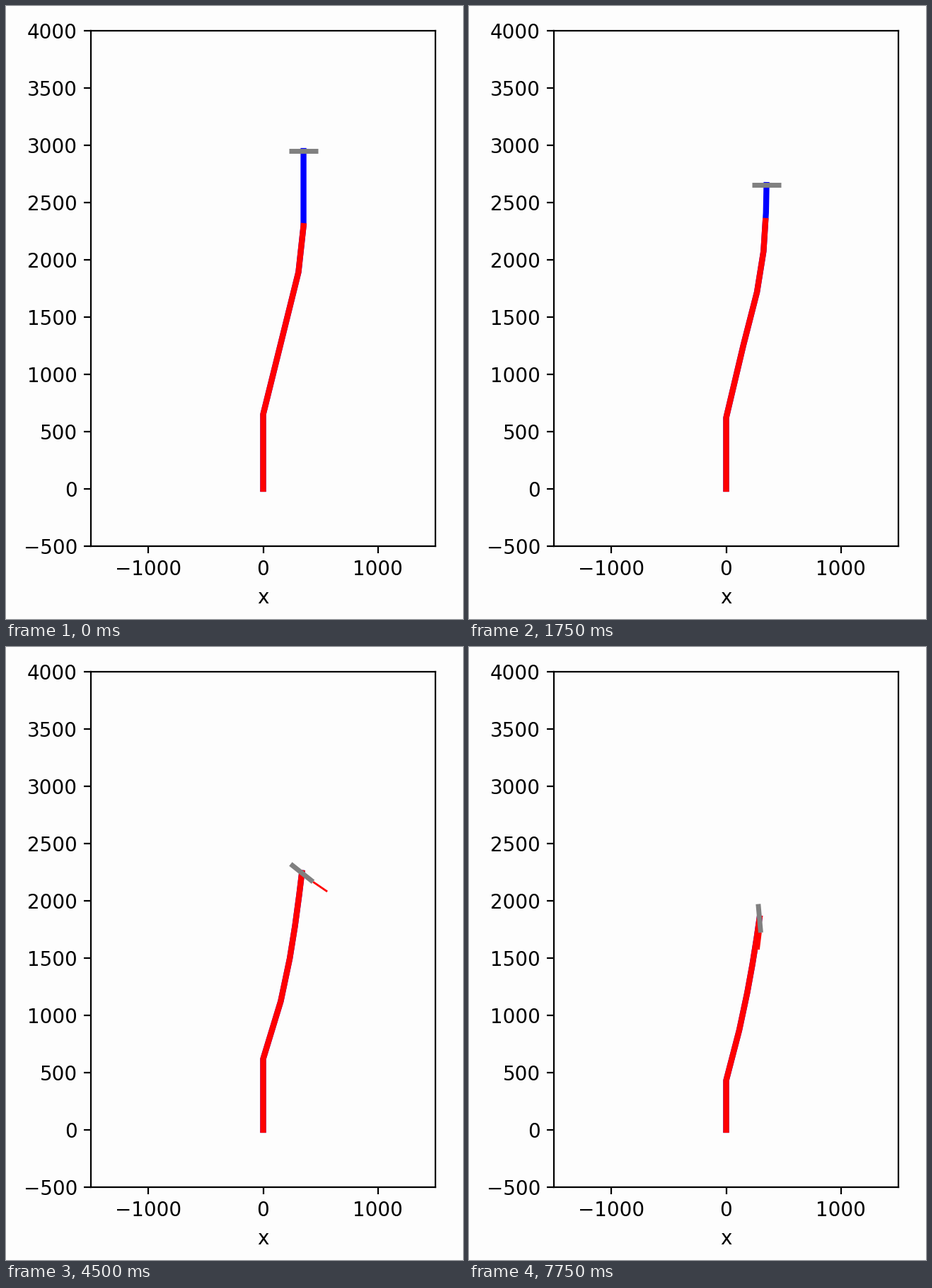
A matplotlib script for the animation above (8000 ms loop, 646 by 867 pixels).

```python
import matplotlib.pyplot as plt
import numpy as np
from matplotlib.animation import FuncAnimation

W, H, DPI = 646, 867, 200
STEP, FRAMES = 250, 32
HALF_DECK, GATE = 125, 150
LEVEL_UNTIL, GATE_OPENS = 2.5, 2.75

# Heights of the boom's joints, as shares of the way from shoulder to tip.
JOINTS = np.array([0, 0.31, 0.54, 0.715, 0.88, 1])


def ramp(t, start, end):
    return np.clip((t - start) / (end - start), 0, 1)


def mix(a, b, k):
    return a + (b - a) * k


def since_level(t):
    return max(0, t - LEVEL_UNTIL)


def tip(t):
    return np.array([352 - 5.1 * since_level(t) ** 1.5,
                     2948 - 177.5 * t + 4.55 * t ** 2])


def shoulder(t):
    """Height at which the boom leaves the vertical."""
    sinking = 650 - 115 * min(t, 1)
    return mix(sinking, 705, ramp(t, 1, 2.5)) - 37.5 * since_level(t) ** 1.2


def sideways(t, u):
    """Share of the tip's x reached at height share u."""
    angular = np.interp(u, [0, 0.54, 0.715, 1], [0, 0.875, 1, 1])
    decay = np.exp(-0.45 * max(0, t - 3.75))
    s_bend = -0.22 + 1.25 * u
    arc = 0.3 + (0.68 - 0.5 * u) * decay
    bulge = mix(s_bend, arc, ramp(t, 2.5, 3.75))
    return mix(angular, u + u * (1 - u) * bulge, ramp(t, 1, 2.5))


def boom_path(t, end=1):
    """Points from the base up to the given share of the boom."""
    x = tip(t)[0] * sideways(t, JOINTS)
    u = np.append(JOINTS[JOINTS < end], end)
    y = mix(shoulder(t), tip(t)[1], u)
    return np.append(0, np.interp(u, JOINTS, x)), np.append(0, y)


def red_share(t):
    return mix(JOINTS[3], 0.976, ramp(t, 1, 2.5)) + 0.024 * ramp(t, 2.5, 2.75)


def heading(degrees):
    """Unit vector turned clockwise from the x axis."""
    a = np.radians(degrees)
    return np.array([np.cos(a), -np.sin(a)])


def deck_angle(t):
    return 90 * (1 - np.exp(-0.172 * since_level(t) ** 1.7))


def gate_angle(t):
    return deck_angle(t) + min(12, 17 * (t - GATE_OPENS) - 34)


def segment(start, end):
    return np.array([start, end]).T


fig = plt.figure(figsize=(W / DPI, H / DPI), dpi=DPI, facecolor="#fdfdfd")
ax = fig.add_axes([120.4 / W, 103 / H, 486.2 / W, 729.5 / H], facecolor="#fdfdfd")
ax.set_xlim(-1500, 1500)
ax.set_ylim(-500, 4000)
ax.set_xticks([-1000, 0, 1000])
ax.set_yticks(range(-500, 4001, 500))
ax.set_xlabel("x")

boom, = ax.plot([], [], color="blue", lw=3)
lower, = ax.plot([], [], color="red", lw=3)
gate, = ax.plot([], [], color="red", lw=1, solid_capstyle="butt")
deck, = ax.plot([], [], color="gray", lw=2.5, solid_capstyle="butt")


def draw(i):
    t = i * STEP / 1000
    boom.set_data(*boom_path(t))
    lower.set_data(*boom_path(t, red_share(t)))

    arm = HALF_DECK * heading(deck_angle(t))
    hinge = tip(t) + arm
    deck.set_data(*segment(tip(t) - arm, hinge))
    gate.set_data(*segment(hinge, hinge + GATE * heading(gate_angle(t))))
    gate.set_visible(t >= GATE_OPENS)
    return boom, lower, gate, deck


anim = FuncAnimation(fig, draw, frames=FRAMES, interval=STEP, repeat=True,
                     repeat_delay=0, blit=False)
plt.show()
```
